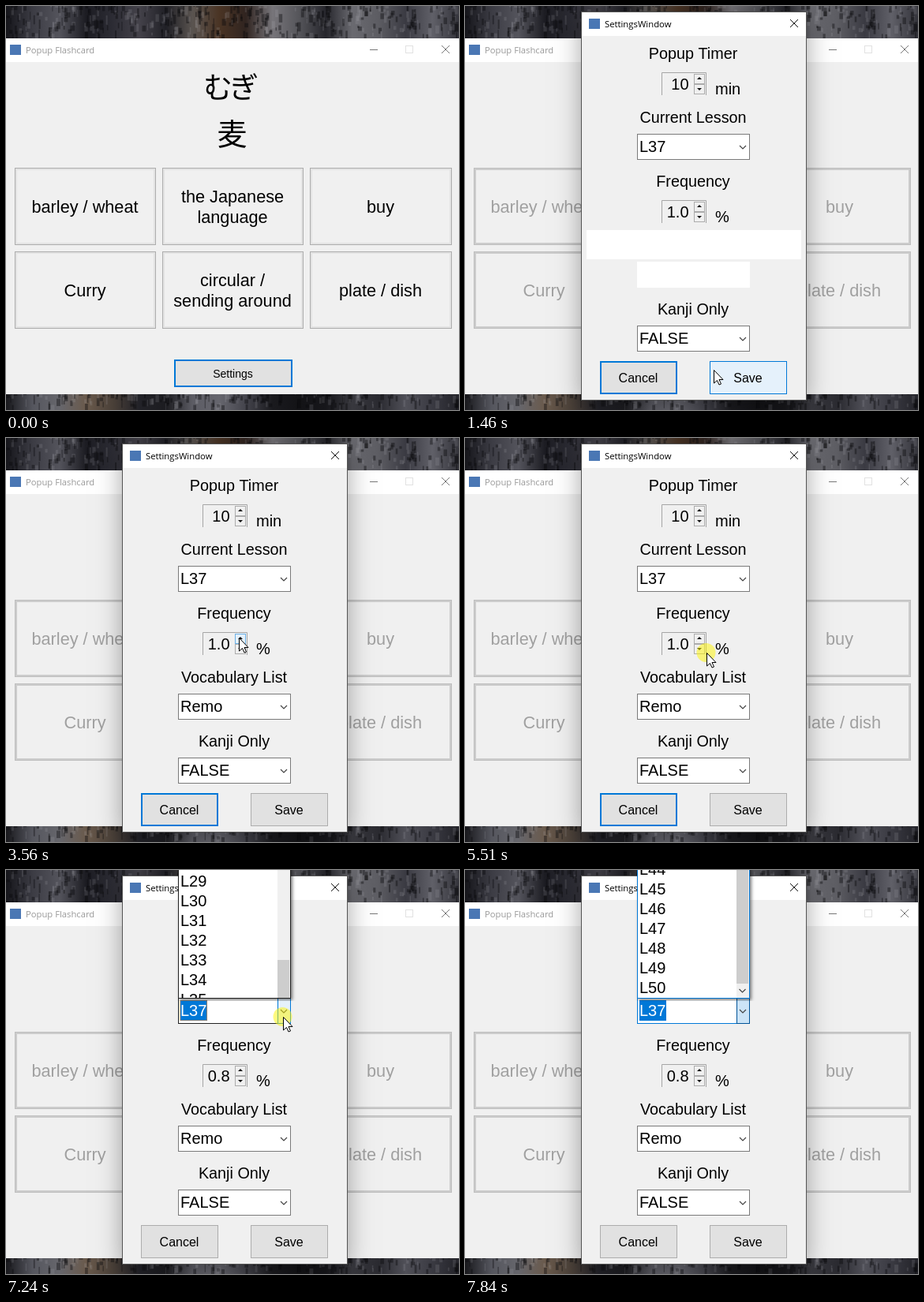
Recreate the animation shown at these times as an HTML page with a canvas. Size 574x512 px, loop 8000 ms.

```html
<!DOCTYPE html>
<html lang="en">
<head>
<meta charset="utf-8">
<title>Popup Flashcard</title>
<style>
html, body { margin: 0; width: 574px; height: 512px; overflow: hidden; }
canvas { display: block; }
</style>
</head>
<body>
<canvas id="stage" width="574" height="512"></canvas>
<script>
const ctx = document.getElementById('stage').getContext('2d');
const SANS = '"Liberation Sans", Arial, sans-serif';
const TITLE = '"Open Sans", sans-serif';
const KANA = '"Noto Sans CJK JP", "Noto Sans CJK", sans-serif';
const BLUE = '#0078d7', GRAY = '#adadad', FACE = '#f0f0f0';
const LOOP = 8000, DIALOG_OPEN = 1460, DROP_START = 7144, DROP_END = 7344;

// Pointer keys: time, x, y
const path = [
  [0, 440, 520], [330, 437, 514], [700, 315, 461], [1750, 315, 461],
  [2370, 308, 130], [2580, 308, 130], [2900, 308, 262], [3190, 308, 262],
  [3370, 303, 184], [3560, 295, 253], [4470, 295, 253], [4550, 309, 275],
  [4835, 309, 275], [4840, 307, 275], [5165, 307, 275], [5170, 306, 272],
  [5590, 306, 272], [5710, 301, 264], [6620, 301, 264], [7080, 351, 186],
  [7300, 351, 186], [7400, 347, 199], [7840, 300, -20], [LOOP, 300, -20]
];
const clicks = [[1370, 1460], [5510, 5630], [5880, 5970], [6340, 6460], [7120, 7320]];

let t = 0, px = 0, py = 0;

function movePointer() {
  const i = path.findIndex(key => key[0] > t);
  const [t0, x0, y0] = path[i - 1], [t1, x1, y1] = path[i];
  const p = (t - t0) / (t1 - t0), e = p * p * (3 - 2 * p);
  px = x0 + (x1 - x0) * e;
  py = y0 + (y1 - y0) * e;
}

const over = (x, y, w, h) => px >= x && px < x + w && py >= y && py < y + h;

function rect(x, y, w, h, fill) {
  ctx.fillStyle = fill;
  ctx.fillRect(x, y, w, h);
}

function box(x, y, w, h, fill, border, weight = 1) {
  rect(x, y, w, h, border);
  rect(x + weight, y + weight, w - 2 * weight, h - 2 * weight, fill);
}

function line(points, color, width = 1) {
  ctx.beginPath();
  points.forEach(([x, y]) => ctx.lineTo(x, y));
  ctx.strokeStyle = color;
  ctx.lineWidth = width;
  ctx.stroke();
}

function polygon(points, fill) {
  ctx.beginPath();
  points.forEach(([x, y]) => ctx.lineTo(x, y));
  ctx.closePath();
  ctx.fillStyle = fill;
  ctx.fill();
}

function text(str, x, y, size, color = '#000', align = 'left', family = SANS, weight = 400) {
  ctx.font = `${weight} ${size}px ${family}`;
  ctx.textAlign = align;
  ctx.fillStyle = color;
  ctx.fillText(str, x, y);
}

function cross(x, y, color) {
  line([[x - 5, y - 5], [x + 5, y + 5]], color);
  line([[x - 5, y + 5], [x + 5, y - 5]], color);
}

function chevron(x, y) {
  line([[x - 4, y - 2], [x, y + 2], [x + 4, y - 2]], '#444', 1.2);
}

// Soft bark tones with vertical grain
function bark(top, height, tones) {
  const shades = tones.split(' ');
  const gradient = ctx.createLinearGradient(0, 0, 574, 0);
  shades.forEach((shade, i) => gradient.addColorStop(i / (shades.length - 1), '#' + shade));
  rect(0, top, 574, height, gradient);
  let seed = 11;
  const random = () => (seed = seed * 16807 % 2147483647) / 2147483647;
  for (let i = 0; i < height * 10; i++) {
    const grain = random() < 0.65 ? 'rgba(8,8,12,.4)' : 'rgba(190,190,200,.14)';
    rect(random() * 574, top - 6 + random() * height, 1 + random() * 4, 3 + random() * 9, grain);
  }
}

function backdrop() {
  bark(0, 42, '15151a 3c3c44 54545c 1c1c22 2c2c34 44424a 202026 5a5450 4a3424 302420 77757a 55555a 26262c 6a6a70 5c5c62 3a3a42 606068 33333a');
  bark(490, 22, '18181c 55565e 66666c 6a5a4c 4a4038 222228 1c1c20 5c5c64 66666e 44444c 1a1a1e 131316 16161a 38383e 2a2a30 505058 3a3a42 222228');
}

function cardButton(x, y, w, lines, enabled) {
  box(x, y, w, 98, '#e3e3e3', enabled ? GRAY : '#bfbfbf');
  if (!enabled) rect(x + 1, y + 1, w - 2, 96, '#cccccc');
  rect(x + 3, y + 3, w - 6, 92, FACE);
  lines.forEach((str, i) => text(str, x + w / 2 - 0.5, y + 57 + 26 * i - 13 * (lines.length - 1),
    21.7, enabled ? '#000' : '#a0a0a0', 'center'));
}

function pushButton(x, y, w, h, label, size, focused) {
  const hot = over(x, y, w, h);
  box(x, y, w, h, hot ? '#e5f1fb' : '#e1e1e1', hot || focused ? BLUE : GRAY, focused && !hot ? 2 : 1);
  text(label, x + w / 2 - 0.5, y + h / 2 + size * 0.4, size, '#000', 'center');
}

function mainWindow(enabled) {
  rect(0, 41, 574, 451, FACE);
  rect(0, 41, 574, 30, '#fff');
  rect(5, 49, 14, 13, '#4a77b4');
  text('Popup Flashcard', 25, 60, 11.25, '#999', 'left', TITLE);
  line([[461, 55.5], [471, 55.5]], '#777');
  ctx.strokeStyle = '#e2e2e2';
  ctx.strokeRect(506.5, 50.5, 9, 9);
  cross(557, 55, '#777');
  ctx.letterSpacing = '-4px';
  text('むぎ', 283, 117, 37, '#000', 'center', KANA, 500);
  ctx.letterSpacing = '0px';
  text('麦', 286.5, 176, 38, '#000', 'center', KANA, 500);
  cardButton(11, 205, 179, ['barley / wheat'], enabled);
  cardButton(198, 205, 179, ['the Japanese', 'language'], enabled);
  cardButton(385, 205, 180, ['buy'], enabled);
  cardButton(11, 311, 179, ['Curry'], enabled);
  cardButton(198, 311, 179, ['circular /', 'sending around'], enabled);
  cardButton(385, 311, 180, ['plate / dish'], enabled);
  pushButton(213, 448, 150, 35, 'Settings', 14, true);
}

function spinner(y, value, unit) {
  line([[249.5, y + 29], [249.5, y + 0.5], [305.5, y + 0.5], [305.5, y + 29]], '#a5a5a5');
  text(value, 283.5, y + 22, 20, '#000', 'right');
  [2, 15].forEach((dy, i) => {
    const hot = over(290, y + dy, 14, 13), cy = y + dy + 6, d = i ? 2 : -2;
    box(290, y + dy, 14, 13, hot ? '#e5f1fb' : FACE, hot ? '#6bb0e6' : '#acacac');
    polygon([[294, cy - d / 2], [300, cy - d / 2], [297, cy + d]], '#111');
  });
  text(unit, 317, y + 28, 20);
}

function combo(y, value) {
  const hot = over(218, y, 143, 37);
  box(218, y, 143, 33, '#fff', hot ? '#333' : '#7a7a7a');
  text(value, 221, y + 23, 20);
  chevron(352, y + 17);
}

function dropDown() {
  const open = t >= DROP_END, border = open ? BLUE : '#222';
  box(218, 162, 143, 33, '#fff', border);
  rect(221, 165, 34, 26, BLUE);
  if (!open) {
    ctx.setLineDash([1, 1]);
    ctx.strokeStyle = '#ff8728';
    ctx.strokeRect(220.5, 165.5, 34, 25);
    ctx.setLineDash([]);
  }
  text('L37', 221, 185, 20, '#fff');
  box(344, 162, 17, 33, open ? '#cce4f7' : '#e5f1fb', open ? '#005499' : BLUE);
  chevron(352, 179);

  // The list slides up from behind the box, redrawn every 40 ms
  const tick = Math.floor(t / 40) * 40;
  const left = (DROP_END - tick) / (DROP_END - DROP_START);
  const shift = 750 * Math.min(1, Math.max(0, left));
  const top = shift - 590;
  ctx.save();
  ctx.beginPath();
  ctx.rect(210, 0, 160, 166);
  ctx.clip();
  if (top < 160) {
    ctx.shadowColor = 'rgba(0,0,0,.5)';
    ctx.shadowBlur = 4;
    ctx.shadowOffsetX = ctx.shadowOffsetY = 2;
    rect(218, top, 143, 163 - top, border);
    ctx.shadowColor = 'transparent';
    ctx.beginPath();
    ctx.rect(219, top + 1, 141, 161 - top);
    ctx.clip();
    rect(219, top + 1, 141, 161 - top, '#fff');
    const hovered = open && py < 161 && px < 344 ? 50 - Math.floor((161 - py) / 25) : 37;
    for (let n = 21; n <= 50; n++) {
      const y = 156 + shift - 25 * (50 - n);
      if (n === hovered) rect(219, y - 20, 125, 25, BLUE);
      text('L' + n, 221, y, 20, n === hovered ? '#fff' : '#000');
    }
    rect(344, top, 16, 752, FACE);
    rect(344, shift - 276, 15, 420, '#cdcdcd');
    chevron(351.5, 153 + shift);
  }
  ctx.restore();
}

function dialog() {
  ctx.save();
  ctx.shadowColor = 'rgba(0,0,0,.35)';
  ctx.shadowBlur = 30;
  ctx.shadowOffsetY = 4;
  rect(147, 7, 286, 493, '#555');
  ctx.restore();
  rect(148, 8, 284, 491, FACE);
  rect(148, 8, 284, 30, '#fff');
  rect(157, 16, 14, 13, '#4a77b4');
  text('SettingsWindow', 177, 27, 11.3, '#000', 'left', TITLE);
  cross(417, 22, '#111');

  ['Popup Timer', 'Current Lesson', 'Frequency', 'Vocabulary List', 'Kanji Only']
    .forEach((label, i) => text(label, 289, 67 + 81 * i, 19.8, '#000', 'center'));
  spinner(84, '10', 'min');
  spinner(246, t < 5880 ? '1.0' : t < 6340 ? '0.9' : '0.8', '%');
  combo(162, 'L37');
  combo(324, 'Remo');
  combo(405, 'FALSE');
  if (t < 1500) {
    rect(154, 284, 272, 37, '#fff');
    rect(218, 323, 143, 34, FACE);
    rect(218, 324, 143, 33, '#fff');
  }
  pushButton(171, 450, 98, 42, 'Cancel', 16, t < 5880);
  pushButton(310, 450, 98, 42, 'Save', 16, false);
  if (t >= DROP_START) dropDown();
}

function pointer() {
  if (clicks.some(([from, to]) => t >= from && t < to)) {
    ctx.beginPath();
    ctx.arc(px - 0.5, py, 12, 0, 7);
    ctx.fillStyle = 'rgba(255,246,0,.5)';
    ctx.fill();
  }
  const arrow = [[0, 0], [0, 16.5], [4, 13], [6.5, 18.5], [9, 17.5], [6.5, 12], [11.5, 12], [0, 0]]
    .map(([x, y]) => [px + x + 0.5, py + y + 0.5]);
  polygon(arrow, '#fff');
  line(arrow, '#000');
}

function draw() {
  t = performance.now() % LOOP;
  movePointer();
  backdrop();
  mainWindow(t < DIALOG_OPEN);
  if (t >= DIALOG_OPEN) dialog();
  pointer();
  requestAnimationFrame(draw);
}
draw();
</script>
</body>
</html>
```
